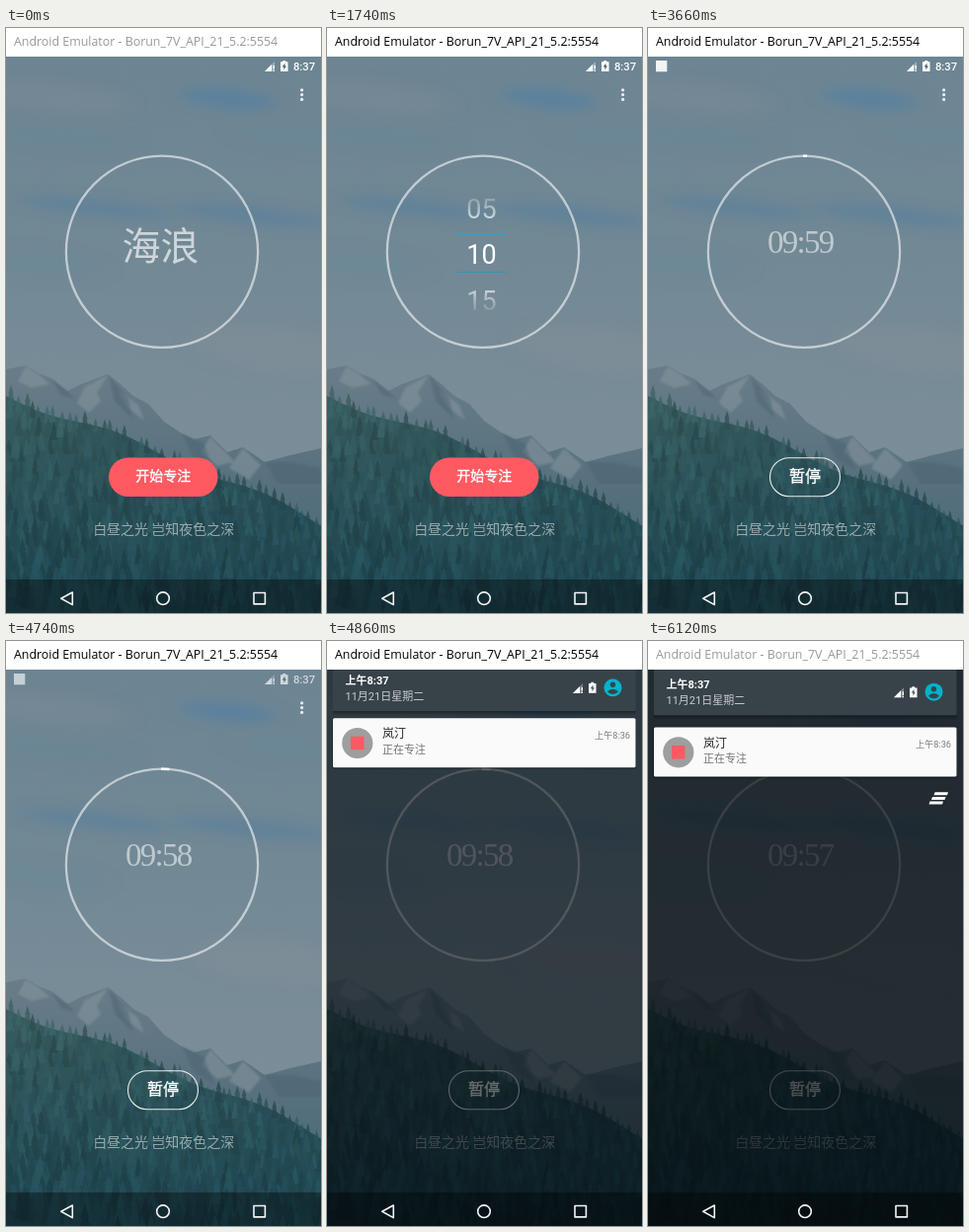
An HTML page for the animation above (6.18 s loop, 319 px wide and 593 px high).

```html
<!DOCTYPE html>
<html lang="zh-CN">
<head>
<meta charset="utf-8">
<title>Focus timer</title>
<style>
  html, body { margin: 0; width: 100%; height: 100%; overflow: hidden; background: #fff; }
  svg { display: block; width: 100vw; height: 100vh; }
  text { font-family: "Noto Sans CJK SC", "Noto Sans CJK", "Noto Sans", sans-serif; }
  .mid { text-anchor: middle; }
  .end { text-anchor: end; }
  .label { fill: #fff; stroke: #fff; stroke-width: .35px; }
  .roboto { font-family: Roboto, "Noto Sans CJK SC", "Noto Sans CJK", sans-serif; }
  .title { font: 12.4px "Open Sans", "Noto Sans", sans-serif; }
  .clock { font: 33px "Liberation Serif", serif; letter-spacing: -1.7px; }
</style>
</head>
<body>
<svg viewBox="0 0 319 593" preserveAspectRatio="none">
  <defs>
    <linearGradient id="sky" x1="0" y1="0" x2="0" y2="1">
      <stop offset="0" stop-color="#6d8593"/>
      <stop offset=".4" stop-color="#718895"/>
      <stop offset=".7" stop-color="#788c98"/>
      <stop offset="1" stop-color="#7c8d97"/>
    </linearGradient>
    <linearGradient id="rock" x1="0" y1="0" x2="0" y2=".6">
      <stop offset="0" stop-color="#697d89"/>
      <stop offset="1" stop-color="#526d7b"/>
    </linearGradient>
    <linearGradient id="wood" x1="0" y1="0" x2=".2" y2="1">
      <stop offset="0" stop-color="#375c60"/>
      <stop offset=".5" stop-color="#28515c"/>
      <stop offset="1" stop-color="#1f4856"/>
    </linearGradient>
    <linearGradient id="fade" x1="0" y1="163" x2="0" y2="293" gradientUnits="userSpaceOnUse">
      <stop offset="0" stop-color="#000"/>
      <stop offset=".34" stop-color="#fff"/>
      <stop offset=".66" stop-color="#fff"/>
      <stop offset="1" stop-color="#000"/>
    </linearGradient>
    <linearGradient id="shade" x1="0" y1="0" x2="0" y2="1">
      <stop offset="0" stop-color="#000" stop-opacity=".4"/>
      <stop offset="1" stop-color="#000" stop-opacity="0"/>
    </linearGradient>
    <filter id="soft" x="-20%" y="-20%" width="140%" height="140%"><feGaussianBlur stdDeviation="10 6"/></filter>
    <filter id="haze"><feGaussianBlur stdDeviation="1"/></filter>
    <mask id="drum" maskUnits="userSpaceOnUse" x="120" y="163" width="74" height="130">
      <rect x="120" y="163" width="74" height="130" fill="url(#fade)"/>
    </mask>
    <clipPath id="below"><rect id="cut" x="0" y="0" width="319" height="593"/></clipPath>
    <g id="signal">
      <path d="M10 0V10H0Z" fill="#fff" opacity=".35"/>
      <path d="M7 3V10H0Z" fill="#fff"/>
      <path d="M9.3 4V7.6M9.3 8.7V10" stroke="#fff" stroke-width="1.3"/>
    </g>
    <g id="battery">
      <path d="M2.3 0H5.2V1.2H7.5V11H0V1.2H2.3Z" fill="#fff"/>
      <path d="M4.4 2.5L1.8 6.4H3.4V9.4L5.9 5.5H4.4Z" fill="#4b5a62"/>
    </g>
  </defs>

  <rect y="29" width="319" height="470" fill="url(#sky)"/>
  <g id="clouds" filter="url(#soft)"></g>
  <path fill="url(#rock)" d="M0 346L20 342L33 350L46 355L62 368L76 361L103 351L116 361L129 373L144 381L160 399L178 411L190 417L207 413L224 430L240 425L262 440L288 433L319 426V593H0Z"/>
  <g fill="#84949d" opacity=".6" filter="url(#haze)">
    <path d="M103 352L92 370L96 378L84 390L72 380L80 364Z"/>
    <path d="M20 343L12 358L26 365L44 361L33 351Z"/>
    <path d="M112 366L122 384L140 398L134 382Z"/>
    <path d="M207 414L198 430L214 444L232 440Z"/>
    <path d="M240 426L226 446L246 458L258 443Z"/>
  </g>
  <g fill="#4c6473" opacity=".5" filter="url(#haze)">
    <path d="M104 352L110 378L128 396L124 376Z"/>
    <path d="M46 356L56 372L70 376L62 368Z"/>
    <path d="M178 411L190 437L211 449L200 421Z"/>
    <path d="M262 440L276 462L319 462V446L288 440Z"/>
  </g>
  <path id="ground" fill="url(#wood)"/>
  <g id="trees"></g>

  <g id="status">
    <use href="#signal" x="262" y="34"/>
    <use href="#battery" x="278" y="33"/>
    <text class="roboto" x="313" y="43" text-anchor="end" font-size="11.2" font-weight="500" fill="#fff">8:37</text>
    <rect id="tray" x="8" y="33" width="11.3" height="11.3" fill="#fff" opacity=".9"/>
  </g>
  <g id="menu" fill="#fff" opacity=".85">
    <circle cx="299.6" cy="62.8" r="1.6"/><circle cx="299.6" cy="67.6" r="1.6"/><circle cx="299.6" cy="72.4" r="1.6"/>
  </g>

  <circle cx="158" cy="226.8" r="97.1" fill="none" stroke="#fff" stroke-opacity=".58" stroke-width="2.3"/>
  <circle id="arc" cx="158" cy="226.8" r="97.1" fill="none" stroke="#fff" stroke-width="2.5" transform="rotate(-90.6 158 226.8)"/>

  <text id="scene" class="mid" x="156.5" y="235" font-size="39" font-weight="300" fill="#fff" fill-opacity=".66">海浪</text>
  <g id="picker">
    <g mask="url(#drum)"><g id="wheel" fill="#fff" font-size="27"></g></g>
    <path d="M131 208.7H182" stroke="#339fc8" stroke-width="1.5"/>
    <path d="M131 247.5H182" stroke="#3d91b3" stroke-width="1.2"/>
  </g>
  <text id="clock" class="clock" x="121" y="228" fill="#fff" fill-opacity=".54"></text>

  <g id="start">
    <rect x="104" y="435.5" width="110.5" height="39.5" rx="19.75" fill="#ff5a61"/>
    <text class="mid label" x="159.2" y="459.2" font-size="14">开始专注</text>
  </g>
  <g id="pause">
    <rect x="123.5" y="435.7" width="71" height="39" rx="19.5" fill="none" stroke="#fff" stroke-width="1.1" stroke-opacity=".9"/>
    <text class="mid label" x="159" y="460" font-size="16">暂停</text>
  </g>
  <text class="mid" x="159.7" y="513.3" font-size="14" font-weight="300" fill="#fff" fill-opacity=".52">白昼之光 岂知夜色之深</text>

  <rect id="scrim" y="29" width="319" height="564" fill="#000508"/>
  <g id="panel">
    <g clip-path="url(#below)">
      <g id="card">
        <rect x="5.5" y="88.5" width="307.5" height="50.5" rx="2" fill="#000" opacity=".35"/>
        <rect x="6" y="87.5" width="306.5" height="50" rx="1.5" fill="#fafafa"/>
        <circle cx="30.8" cy="112.8" r="15.6" fill="#9e9e9e"/>
        <rect x="24" y="106" width="13.5" height="13.5" fill="#f95a64"/>
        <text x="56" y="107.7" font-size="12" fill="#212121">岚汀</text>
        <text x="56" y="123.4" font-size="11" fill="#757575">正在专注</text>
        <text class="roboto end" x="307" y="108" font-size="9.2" fill="#7d7d7d">上午8:36</text>
      </g>
    </g>
    <g id="head">
      <rect x="6" y="75" width="306.5" height="5" fill="url(#shade)"/>
      <rect x="6" y="10" width="306.5" height="65.3" rx="1.5" fill="#384349"/>
      <text class="roboto" x="18.5" y="48" font-size="11" font-weight="700" fill="#fff">上午8:37</text>
      <text class="roboto" x="18.5" y="64" font-size="11" fill="#c8cdd0">11月21日星期二</text>
      <use href="#signal" x="249" y="47.3"/>
      <use href="#battery" x="265" y="46.2"/>
      <circle cx="289.5" cy="51.7" r="9" fill="#00b4cd"/>
      <circle cx="289.5" cy="48.7" r="2.7" fill="#384349"/>
      <path d="M284 55.6Q286 53.1 289.5 53.1T295 55.6Q293 58.3 289.5 58.3T284 55.6Z" fill="#384349"/>
    </g>
    <path id="clear" fill="#fff" d="M290.5 153.2H304L303 156.2H289.5ZM288 157.9H301.5L300.5 160.9H287ZM285.5 162.6H299L298 165.6H284.5Z"/>
  </g>

  <rect y="559" width="319" height="34" fill="#000" opacity=".36"/>
  <g fill="none" stroke="#fff" stroke-width="1.6" stroke-linejoin="round" opacity=".95">
    <path d="M67.3 572L55.8 578.3L67.3 584.6Z"/>
    <circle cx="159" cy="578.2" r="6.3"/>
    <rect x="251" y="572.5" width="11.4" height="11.4"/>
  </g>

  <rect width="319" height="29" fill="#fff"/>
  <text id="title" class="title" x="8" y="18">Android Emulator - Borun_7V_API_21_5.2:5554</text>
</svg>
<script>
  const LOOP = 6180, TICK = 60, ROW = 46.5;
  const $ = id => document.getElementById(id);
  const show = (id, on) => $(id).setAttribute('display', on ? 'inline' : 'none');
  const set = (id, name, v) => $(id).setAttribute(name, v);
  const shift = (id, y) => set(id, 'transform', `translate(0 ${y.toFixed(2)})`);
  const clamp = v => Math.max(0, Math.min(1, v));

  let seed = 17;
  const rand = () => (seed = (seed * 16807) % 2147483647) / 2147483647;

  // Cloud bands: x, y, rx, ry, colour, opacity
  $('clouds').innerHTML = [
    [45, 70, 80, 14, '#7a8b95', .5], [225, 72, 48, 10, '#4f7fa3', .6],
    [60, 112, 70, 10, '#65859a', .45], [290, 110, 60, 12, '#6b8799', .5],
    [90, 182, 80, 8, '#557f9d', .5], [250, 190, 80, 9, '#557f9d', .5],
    [40, 240, 60, 14, '#698799', .4], [270, 325, 80, 22, '#838f97', .5]
  ].map(([x, y, rx, ry, c, o]) =>
    `<ellipse cx="${x}" cy="${y}" rx="${rx}" ry="${ry}" fill="${c}" opacity="${o}" transform="rotate(6 ${x} ${y})"/>`
  ).join('');

  // Forest: slope height, then rows of firs down to the lower edge
  const slope = x => 373 + x * .34 + x * x * .0002 + 4 * Math.sin(x / 24);
  let edge = 'M0 593';
  for (let x = 0; x <= 320; x += 4) edge += `L${x} ${slope(x).toFixed(1)}`;
  $('ground').setAttribute('d', edge + 'V593Z');

  const fir = (x, y, h) => {
    const w = h * .22;
    return `M${x} ${y - h}l${w * .6} ${h * .45}h${-w * .2}l${w * .6} ${h * .55}h${-w * 2}l${w * .6} ${-h * .55}h${-w * .2}Z`;
  };
  let firs = '';
  for (let row = 0; row < 16; row++) {
    for (let x = -4; x < 324; x += 5 + rand() * 5) {
      const y = slope(x) + 6 + row * 13 + rand() * 8;
      if (y > 615) continue;
      const k = .8 + .36 * rand(), dim = clamp((y - 370) / 220);
      const col = [58 - 26 * dim, 93 - 20 * dim, 92 - 8 * dim].map(v => Math.round(v * k));
      firs += `<path d="${fir(+x.toFixed(1), +y.toFixed(1), 13 + row * .8 + rand() * 9)}" fill="rgb(${col})" opacity=".75"/>`;
    }
  }
  $('trees').innerHTML = firs;

  $('wheel').innerHTML = ['60', '05', '10', '15', '20'].map((n, i) =>
    `<text class="roboto mid" x="156.5" y="${239.3 + (i - 2) * ROW}">${n}</text>`).join('');

  function draw(ms) {
    const t = Math.floor(ms / TICK) * TICK;
    set('title', 'fill', t < 600 || t >= 6120 ? '#999' : '#000');

    const picking = t >= 720 && t < 2820, running = t >= 3540;
    show('picker', picking);
    show('scene', !picking && !running);
    const p = clamp((t - 1440) / 300);
    shift('wheel', ROW * (1 - p) ** 2);

    const gone = running ? Math.floor((t - 3600) / 1020) + 1 : 0;
    const left = 600 - gone;
    $('clock').textContent = String(Math.floor(left / 60)).padStart(2, '0') + ':' + String(left % 60).padStart(2, '0');
    show('clock', running);
    show('pause', running);
    show('start', !running);
    show('arc', gone > 0);
    set('arc', 'stroke-dasharray', `${gone * 4.3} 700`);
    show('tray', t >= 3660);

    // Notification shade eases down
    const open = t >= 4800;
    const rest = open && t < 4980 ? .316 ** ((t - 4800) / TICK) : 0;
    show('status', !open);
    show('menu', !open);
    set('status', 'opacity', t >= 4740 ? .68 : 1);
    show('panel', open);
    set('scrim', 'opacity', open ? .7 - .23 * rest ** .6 : 0);
    shift('card', -29.5 * rest);
    shift('head', -14 * rest);
    set('cut', 'y', 80.5 - 14 * rest);
    set('clear', 'opacity', clamp((t - 5280) / 300));
  }

  const t0 = performance.now();
  function frame() {
    draw((performance.now() - t0) % LOOP);
    requestAnimationFrame(frame);
  }
  frame();
</script>
</body>
</html>
```
